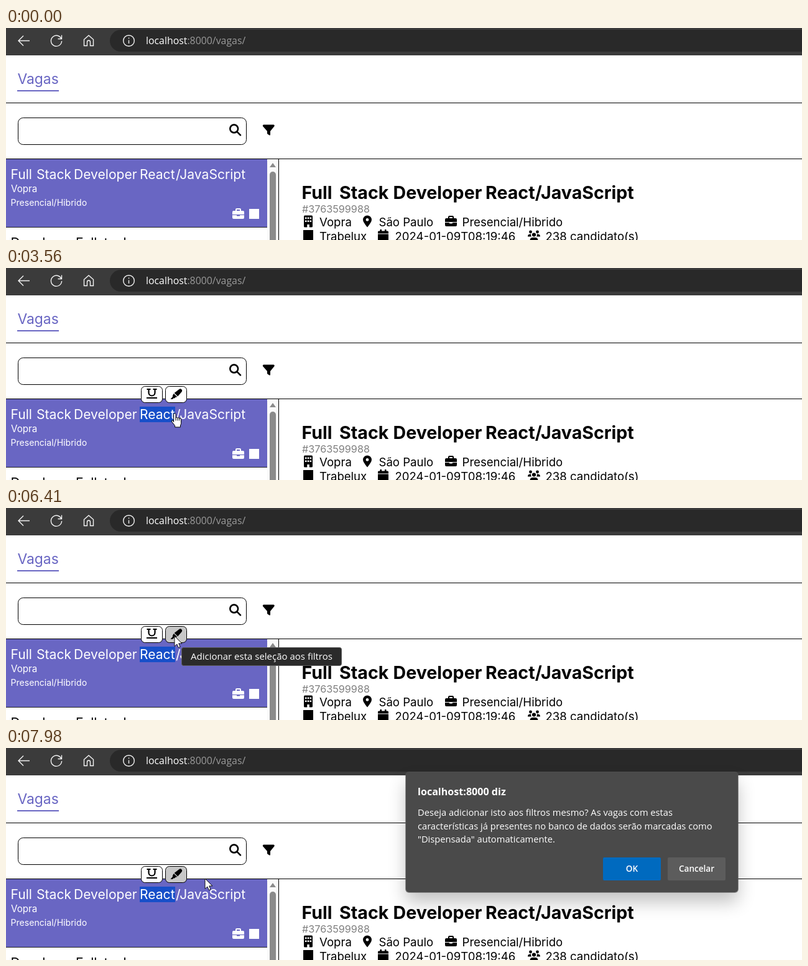
Write an HTML page that moves like this. It is 1280 by 341 pixels and loops after 8000 ms.

```html
<!DOCTYPE html>
<html lang="pt-BR">
<head>
<meta charset="utf-8">
<title>Vagas</title>
<style>
html, body { margin: 0; width: 100%; height: 100%; overflow: hidden; background: #fff; }
svg { position: absolute; display: block; font-optical-sizing: none; }
#page { left: 0; top: 0; font-family: Inter, sans-serif; }
#dialog {
  left: 643px; top: 39px; overflow: visible; background: #4a4a4a; border-radius: 5px;
  box-shadow: 0 0 0 1px rgba(90, 90, 90, .6), 0 16px 28px rgba(0, 0, 0, .24);
  fill: #fff; font: 14.7px "Open Sans", sans-serif;
}
.ui { font-family: "Open Sans", sans-serif; }
.title { font-size: 21.1px; }
.info { font-size: 18.6px; }
.line { fill: none; stroke: #f2f2f2; stroke-width: 1.4; }
.mid { text-anchor: middle; }
.strong { font-size: 13.6px; font-weight: 600; }
.key { stroke: #000; }
</style>
</head>
<body>
<svg id="page" width="1280" height="341" viewBox="0 0 1280 341">
  <defs>
    <path id="case" fill-rule="evenodd" d="M5 4V2Q5 0 7 0h5q2 0 2 2v2h3q2 0 2 2v4H0V6Q0 4 2 4zM7 2v2h5V2zM0 11h7v1.5h5V11h7v4q0 2-2 2H2q-2 0-2-2z"/>
  </defs>

  <!-- browser bar -->
  <rect width="1280" height="44" fill="#3b3b3b"/>
  <rect x="167" y="3" width="1140" height="35" rx="17.5" fill="#292929"/>
  <g class="line">
    <path d="M38 20.5H20M28 12.5l-8 8 8 8"/>
    <path d="M89 17.5a8.6 8.6 0 1 0 .6 3.5M89.5 11.5v6h-6"/>
    <path d="M125.5 18.5L133 12l7.5 6.5V28.500h-5v-6a2.500 2.500 0 0 0-5 0v6h-5z"/>
    <circle cx="197.500" cy="20.500" r="8.800"/>
    <path d="M197.500 19.500v5.500M197.500 15.500v1.800"/>
  </g>
  <text class="ui" x="225" y="26" font-size="15.85" fill="#fff">localhost<tspan fill="#9a9a9a">:8000/vagas/</tspan></text>

  <!-- header and search -->
  <text x="18.500" y="90" font-size="22.800" fill="#6966c3">Vagas</text>
  <path d="M18 100h67v2H18z" fill="#6966c3"/>
  <path d="M0 120h1280v1H0zM0 210h1280v1H0zM438 210h1v131h-1z"/>
  <rect x="19.500" y="144.500" width="367" height="43" rx="8" fill="none" stroke="#000"/>
  <g fill="none" stroke="#000" stroke-width="2.600">
    <circle cx="366.700" cy="162" r="6.400"/>
    <path d="M371.500 166.800l5.500 5.500" stroke-linecap="round"/>
  </g>
  <path d="M414 155.500h16.500q2 .8 1 2.500L425 166v6q-.8 1-2 .3l-3-2.300v-4l-7-8q-.8-1.800 1-2.500z"/>

  <!-- list -->
  <path d="M0 211h420v109H0z" fill="#6966c3"/>
  <path d="M0 320h420v1H0z" fill="#222"/>
  <path d="M420 211h18v130h-18z" fill="#fafafa"/>
  <path d="M424 224l5-7 5 7z" fill="#8b8b8b"/>
  <rect x="424" y="231" width="10" height="130" rx="5" fill="#8b8b8b"/>
  <rect id="sel" x="215" y="223" height="25" fill="#174fc9"/>
  <g fill="#fff">
    <text class="title" y="243"><tspan x="7.500">Full</tspan><tspan x="49">Stack</tspan><tspan x="109">Developer</tspan><tspan x="215">React</tspan><tspan x="273">/JavaScript</tspan></text>
    <text x="8" y="263.500" font-size="15.200">Vopra</text>
    <text x="7.500" y="286" font-size="14.100">Presencial/Hibrido</text>
    <use href="#case" x="364" y="290"/>
    <path d="M391 291h16v16h-16z"/>
  </g>
  <text class="title" y="353"><tspan x="7.500">Developer</tspan><tspan x="112">Fullstack</tspan></text>

  <!-- details -->
  <text y="274.500" font-size="28.600" font-weight="700"><tspan x="475.500">Full</tspan><tspan x="536">Stack</tspan><tspan x="622.500">Developer</tspan><tspan x="771">React/JavaScript</tspan></text>
  <text x="476" y="297" font-size="16.200" fill="#808080">#3763599988</text>
  <g class="info">
    <text y="319"><tspan x="504">Vopra</tspan><tspan x="599.500">São Paulo</tspan><tspan x="733.500">Presencial/Hibrido</tspan></text>
    <text y="342"><tspan x="504">Trabelux</tspan><tspan x="625.500">2024-01-09T08:19:46</tspan><tspan x="867.500">238 candidato(s)</tspan></text>
  </g>
  <path fill-rule="evenodd" d="M480.500 301.500h11q1.500 0 1.500 1.500v16q0 1.500-1.500 1.500h-11q-1.500 0-1.500-1.500v-16q0-1.500 1.500-1.500zM481 304.500v2.500h2.500v-2.500zM484.800 304.500v2.500h2.500v-2.500zM488.600 304.500v2.500h2.500v-2.500zM481 309.500v2.500h2.500v-2.500zM484.800 309.500v2.500h2.500v-2.500zM488.600 309.500v2.500h2.500v-2.500zM484.300 316v4.500h3.500V316z"/>
  <path fill-rule="evenodd" d="M581 320.500q-7-8.500-7-12a7 7 0 0 1 14 0q0 3.500-7 12zM581 306a2.400 2.400 0 0 0 0 4.800 2.400 2.400 0 0 0 0-4.800z"/>
  <use href="#case" x="706" y="302"/>
  <path d="M478 325h16v16h-16z"/>
  <path d="M601.500 324h2.500v2.500h5V324h2.500v2.500h2q1.500 0 1.500 1.500v2.500h-17V328q0-1.500 1.500-1.500h2zM598 331.500h17V341h-17z"/>
  <path d="M839 335.500q0-4 4-4h1.500q-1 2 .5 4zM859 335.500q0-4-4-4h-1.500q1 2-.5 4zM842.500 342q0-5 4.500-5h4q4.500 0 4.500 5z"/>
  <circle cx="843.500" cy="328" r="2.400"/>
  <circle cx="854.500" cy="328" r="2.400"/>
  <circle cx="849" cy="332.500" r="3.100"/>

  <!-- selection tools -->
  <g id="tools">
    <rect id="under" class="key" x="217.500" y="190.500" width="34" height="26" rx="6"/>
    <rect id="mark" class="key" x="256.500" y="190.500" width="34" height="26" rx="6"/>
    <path d="M226.500 195h6M236.500 195h6M229.500 195v5.500a5 5 0 0 0 10 0V195M226 209h17" fill="none" stroke="#000" stroke-width="2.200"/>
    <path d="M278.500 195q2-1.500 3.800.2t.4 3.800l-6.500 7.500-5.500-5.500zM269.800 202l5.500 5.300-2.800.7-1.500 1.500h-2l-1 1.500h-3.500l3.500-4v-2z"/>
  </g>

  <g id="tipUnder" class="ui">
    <rect x="240.500" y="225.500" width="147" height="29" rx="3" fill="#2b2b2b" stroke="#5c5c5c"/>
    <text class="mid" x="314" y="245" font-size="15" fill="#fff">Sublinhar palavra</text>
  </g>
  <g id="tipMark" class="ui">
    <rect x="282.500" y="224.500" width="257" height="29" rx="3" fill="#2b2b2b" stroke="#5c5c5c"/>
    <text class="mid" x="411" y="244" font-size="15" fill="#fff">Adicionar esta seleção aos filtros</text>
  </g>

  <g id="cursor" fill="#fff" stroke="#000">
    <path id="arrow" d="M0 0V16.500L3.900 13l2.400 5.600 2.800-1.200-2.400-5.500H12z" stroke-width=".9"/>
    <path id="hand" d="M-2 14V2a1.700 1.700 0 0 1 3.400 0v5.500q1.600-1.200 3 .2 1.800-.8 2.800.5 2.600-.4 2.800 2V16q0 2-1.200 3.500v3H0V20l-5.200-6.500q-.6-2 1.400-2zM1.400 7.500V12M4.400 8v4M7.200 8.500V12"/>
    <circle id="press" r="14" fill="#e4d40a" fill-opacity=".62" stroke="none"/>
  </g>
</svg>

<svg id="dialog" width="534" height="193" viewBox="0 0 534 193">
  <text x="19" y="37" font-size="16.100" font-weight="700">localhost:8000 diz</text>
  <text x="19" y="70">Deseja adicionar isto aos filtros mesmo? As vagas com estas</text>
  <text x="19" y="91.500">características já presentes no banco de dados serão marcadas como</text>
  <text x="19" y="113">"Dispensada" automaticamente.</text>
  <rect x="317" y="137" width="93" height="37" rx="2" fill="#006abf"/>
  <rect x="421" y="137" width="93" height="37" rx="2" fill="#5c5c5c"/>
  <text class="mid strong" x="363.500" y="160">OK</text>
  <text class="mid strong" x="467.500" y="160">Cancelar</text>
</svg>

<script>
const LOOP = 8000, STEP = 50;
const $ = id => document.getElementById(id);
const show = (id, on) => { $(id).style.display = on ? "" : "none"; };
const within = (t, a, b) => t >= a && t < b;

// Pointer moves: first step, last step, x, y
const moves = [
  [1330, 1630, 222, 231],
  [2450, 2500, 217, 231],
  [2850, 3000, 273, 233],
  [3460, 3510, 272, 239],
  [3560, 4010, 270, 210],
  [4230, 4330, 230, 208],
  [5490, 5490, 246, 207],
  [5540, 5540, 253, 207],
  [5860, 5910, 271, 206],
  [7880, 7980, 320, 210]
];

function pointer(t) {
  let x = 176, y = 362;
  for (const [from, to, nx, ny] of moves) {
    if (t < from) break;
    const steps = (to - from) / STEP + 1;
    const p = Math.min(1, (Math.floor((t - from) / STEP) + 1) / steps);
    const e = p * (2 - p);
    x += (nx - x) * e;
    y += (ny - y) * e;
  }
  return [x, y];
}

function draw(t) {
  const [x, y] = pointer(t);
  const onTools = t >= 3410 && y < 219;
  const hover = (id, on) => $(id).setAttribute("fill", on ? "#c8c8c8" : "#fff");

  show("cursor", t >= 1330);
  $("cursor").setAttribute("transform", `translate(${x} ${y})`);
  show("arrow", onTools);
  show("hand", !onTools);
  show("press", within(t, 1990, 2090) || within(t, 2800, 3410) || within(t, 7620, 7730));

  $("sel").setAttribute("width", t < 2850 ? 0 : t < 3000 ? Math.min(57, x - 215) : 57);
  show("tools", t >= 3410);
  hover("under", onTools && within(x, 217, 252));
  hover("mark", onTools && (within(x, 256, 291) || t >= 7620));
  show("tipUnder", within(t, 4830, 5490));
  show("tipMark", within(t, 6410, 7620));

  show("dialog", t >= 7830);
  const shown = [.7, .9, 1][Math.min(2, Math.max(0, Math.floor((t - 7830) / STEP)))];
  const q = (1 - shown) / .3;
  $("dialog").style.opacity = shown;
  $("dialog").style.transform = q
    ? `perspective(2000px) translate3d(0, ${-11 * q}px, ${10 * q}px) rotateX(${5 * q}deg)`
    : "none";
}

function tick(now) {
  draw(now % LOOP);
  requestAnimationFrame(tick);
}
draw(0);
requestAnimationFrame(tick);
</script>
</body>
</html>
```
